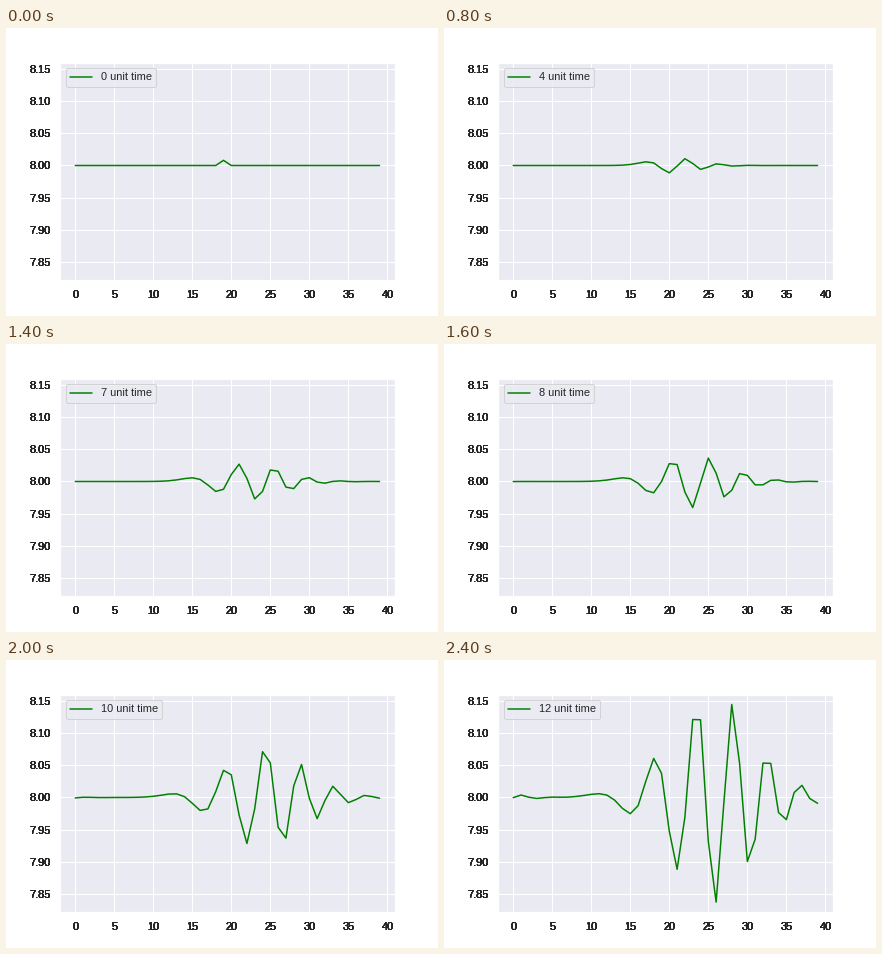
A matplotlib script that plays this animation: 432 px wide and 288 px high, repeating every 2.6 s.

```python
import matplotlib.pyplot as plt
import numpy as np
from matplotlib.animation import FuncAnimation

SITES, FORCING, DT, STEPS = 40, 8.0, 0.05, 13
INK, PANEL = "#262626", "#EAEAF2"
LABEL_PASSES = 10

plt.rcParams.update({
    "font.family": "Liberation Sans",
    "font.size": 11,
    "text.color": INK,
    "axes.facecolor": PANEL,
    "axes.edgecolor": "white",
    "axes.linewidth": 1.25,
    "axes.axisbelow": True,
    "grid.color": "white",
    "grid.linewidth": 1,
    "lines.linewidth": 1.5,
    "lines.solid_capstyle": "round",
    "legend.fontsize": 11,
})
for side in ("xtick", "ytick"):
    plt.rcParams.update({
        f"{side}.color": INK,
        f"{side}.labelsize": 11,
        f"{side}.major.size": 6,
        f"{side}.major.pad": 3.5,
    })
plt.rcParams.update({"xtick.bottom": False, "ytick.left": False})


def tendency(x):
    """Cyclic advection with damping and constant forcing."""
    return (np.roll(x, -1) - np.roll(x, 2)) * np.roll(x, 1) - x + FORCING


def advance(x):
    """One fourth-order Runge-Kutta step."""
    k1 = tendency(x)
    k2 = tendency(x + DT / 2 * k1)
    k3 = tendency(x + DT / 2 * k2)
    k4 = tendency(x + DT * k3)
    return x + DT / 6 * (k1 + 2 * k2 + 2 * k3 + k4)


def simulate():
    x = np.full(SITES, FORCING)
    x[19] += 0.008
    states = [x]
    while len(states) < STEPS:
        states.append(advance(states[-1]))
    return np.array(states)


def padded(low, high):
    margin = 0.05 * (high - low)
    return low - margin, high + margin


states = simulate()

fig = plt.figure(figsize=(6, 4), dpi=72, facecolor="white")
box = [0.125, 0.125, 0.775, 0.755]
ax = fig.add_axes(box)
ax.set_xticks(range(0, 41, 5))
ax.set_yticks(np.linspace(7.85, 8.15, 7))
ax.set_xlim(*padded(0, SITES - 1))
ax.set_ylim(*padded(states.min(), states.max()))
ax.yaxis.set_major_formatter("{x:.2f}")
ax.grid(True)
line, = ax.plot(states[0], color="green")

# Repeated passes give the tick labels their heavy, hard edges.
for _ in range(LABEL_PASSES - 1):
    fig.add_axes(box, sharex=ax, sharey=ax, frameon=False)


def update(step):
    line.set_ydata(states[step])
    ax.legend([line], [f"{step} unit time"], loc="upper left",
              facecolor=PANEL, edgecolor="0.8", framealpha=0.8)
    return line,


animation = FuncAnimation(fig, update, frames=STEPS, interval=200,
                          repeat=True, repeat_delay=0, blit=False)
plt.show()
```
